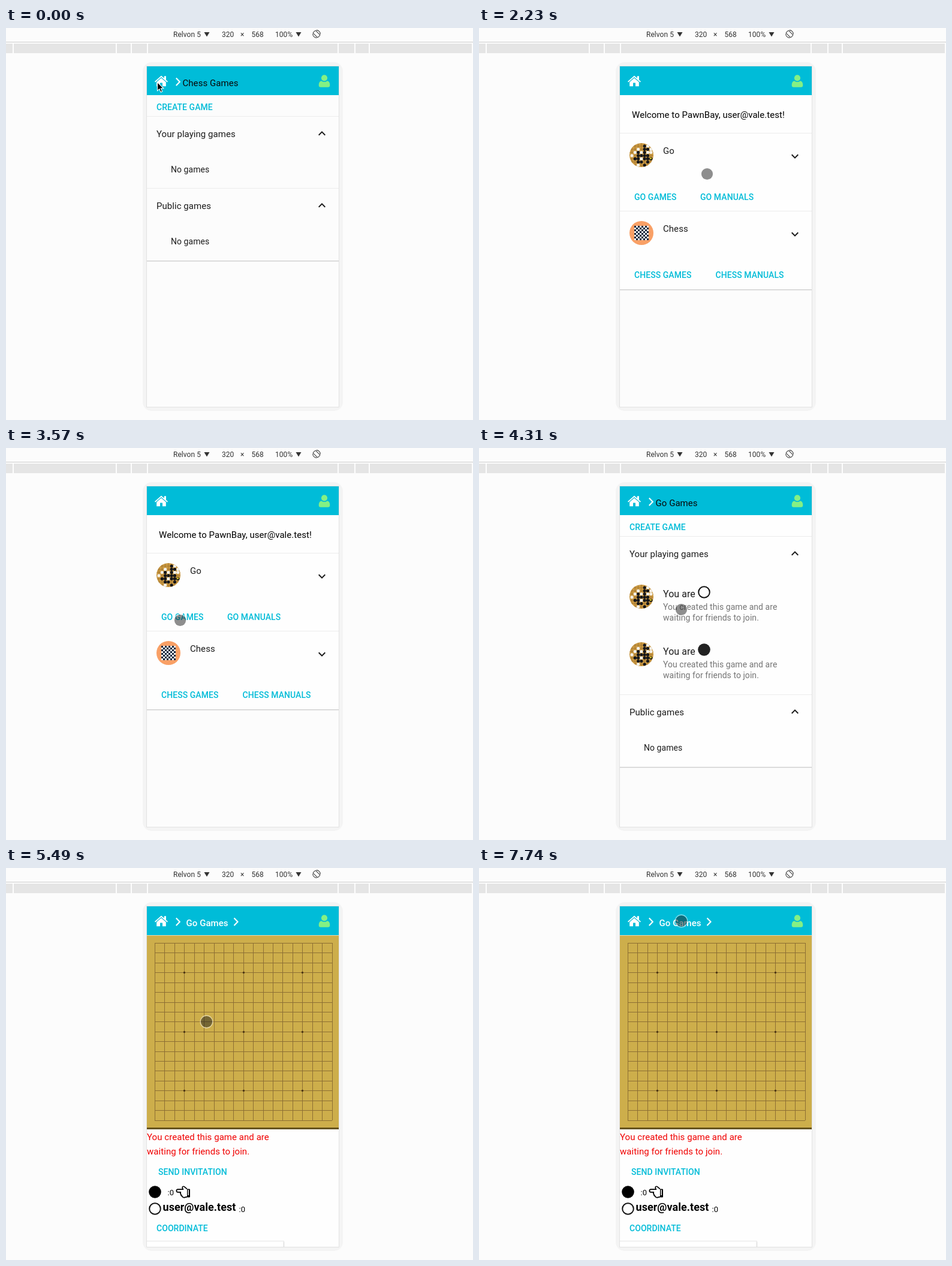
These frames come from a looping animation (779x654 px, 8000 ms). An HTML page:

```html
<!DOCTYPE html>
<html lang="en">
<head>
<meta charset="utf-8">
<title>Board game app</title>
<style>
html, body { margin: 0; width: 100%; height: 100%; overflow: hidden; background: #fcfcfc; }
svg { display: block; width: 100vw; height: 100vh; }
text { font-family: Roboto, Arial, sans-serif; font-size: 15px; letter-spacing: .05px; white-space: pre; }
</style>
</head>
<body>
<svg id="stage" viewBox="0 0 779 654"></svg>
<script>
const LOOP = 8000;
const CYAN = '#00bcd8', INK = '#1c1c1c';
const MAIL = 'user@vale.test';

const rect = (x, y, w, h, fill, more = '') =>
  `<rect x="${x}" y="${y}" width="${w}" height="${h}" fill="${fill}" ${more}/>`;
const disc = (x, y, r, fill, more = '') =>
  `<circle cx="${x}" cy="${y}" r="${r}" fill="${fill}" ${more}/>`;
const path = (d, fill, more = '') => `<path d="${d}" fill="${fill}" ${more}/>`;
const text = (x, y, s, fill = INK, size = 15, weight = 400) =>
  `<text x="${x}" y="${y}" fill="${fill}" style="font-size:${size}px;font-weight:${weight}">${s}</text>`;
const button = (x, y, s) => text(x, y, s, CYAN, 14, 500);
const divider = y => rect(235, y, 320, 1, '#ececec');
const ring = (x, y) => disc(x, y, 9.3, 'none', 'stroke="#111" stroke-width="2"');
const move = (x, y, body) => `<g transform="translate(${x} ${y})">${body}</g>`;
const times = (n, f) => Array.from({ length: n }, (_, i) => f(i)).join('');

const paper = (bottom, fill = '#fefefe') =>
  rect(235, 112, 320, bottom - 112, fill) +
  rect(235, bottom, 320, 1, '#cfcfcf') + rect(235, bottom + 1, 320, 1, '#e9e9e9');

const arrowUp = y => move(515, y - 12, path('M12 8l-6 6 1.41 1.41L12 10.83l4.59 4.58L18 14z', INK));
const arrowDown = y => move(515, y - 12, path('M16.59 8.59L12 13.17 7.41 8.59 6 10l6 6 6-6z', INK));
const crumb = x => path(`M${x} 83.5l6 6.2-6 6.2`, 'none', 'stroke="#fff" stroke-width="2.1"');

function goAvatar(x, y) {
  const rows = ['....bw.', '..w.bbw', '.wbwbww', 'w.bbbb.', '.bbwbbb', '..bb.b.', '..w.b..'];
  const lines = times(7, i => path(`M${-16 + i * 5.3} -20v40M-20 ${-15 + i * 5.3}h40`, 'none',
    'stroke="#93682a" stroke-width=".6"'));
  const stones = rows.map((row, j) => [...row].map((c, i) => c === '.' ? '' :
    disc(-16 + i * 5.3, -15 + j * 5.3, 2.6, c === 'b' ? '#17171a' : '#f5f1e8')).join('')).join('');
  return move(x, y, disc(0, 0, 20, '#cc9a42') +
    `<g clip-path="url(#round)">${lines}${stones}${disc(15.5, 5.5, 1.6, '#d9c622')}</g>`);
}

function chessAvatar(x, y) {
  const dark = times(32, k => {
    const j = k >> 2, i = (k & 3) * 2 + (j & 1);
    return rect(-12 + i * 3, -12 + j * 3, 3, 3, '#18273d');
  });
  return move(x, y, disc(0, 0, 20, '#f9a066') + rect(-12, -12, 24, 24, '#eef0f0') + dark);
}

function toolbar() {
  const drop = x => path(`M${x} 7h9l-4.5 7.5z`, '#333');
  const label = (x, s) => text(x, 15, s, '#333', 12);
  const turn = move(518, 10,
    '<g fill="none" stroke="#444" stroke-width="1.1">' +
    '<rect x="-3" y="-5.6" width="6" height="11.2" rx="1" transform="rotate(-45)"/>' +
    '<path d="M-.5 -6.3A6.3 6.3 0 0 1 6.3 .5M.5 6.3A6.3 6.3 0 0 1 -6.3 -.5"/></g>');
  const gaps = [11, 183, 208, 235, 553, 581, 605, 777].map(x => rect(x, 26, 2, 16, '#fdfdfd')).join('');
  return label(279, 'Relvon 5') + drop(330.5) + label(360, '320') + label(391, '×') +
    label(409.5, '568') + label(449, '100%') + drop(483.5) + turn +
    rect(0, 23, 779, 1, '#cccccc') + rect(0, 26, 779, 16, '#e5e5e5') + gaps;
}

function phone() {
  return rect(228, 57, 334, 582, '#f4f4f4', 'rx="15"') +
    rect(234, 63, 322, 570, '#e2e2e2') + rect(235, 64, 320, 568, '#fcfcfc');
}

function header() {
  const home = path('M248 89.2L259 79.6L263.8 83.8V80.3H267V86.6L270 89.2L268.8 90.5L259 82L249.2 90.5Z', '#fff') +
    path('M259 83.4L266.8 90.2V97.3H261V91.5H257V97.3H251.2V90.2Z', '#fff');
  const user = disc(531, 83.4, 5.1, '#84f084') +
    path('M526 88.2Q531 92 536 88.2Q540.3 89 540.3 95.5Q540.3 98.8 537 98.8H525Q521.7 98.8 521.7 95.5Q521.7 89 526 88.2Z', '#84f084');
  return rect(235, 64, 320, 48, CYAN) + home + user;
}

function listHead(title) {
  return crumb(283.8) + text(294.5, 97, title, '#080808') + button(251, 137, 'CREATE GAME') +
    divider(147) + text(251, 182, 'Your playing games') + arrowUp(176);
}

const publicGames = y => divider(y) + text(251, y + 35, 'Public games') + arrowUp(y + 29) +
  text(275, y + 94, 'No games', INK, 14);

const chessList = () => paper(388, '#fcfcfc') + listHead('Chess Games') +
  text(275, 241, 'No games', INK, 14) + publicGames(267);

const homePage = () => paper(436) + text(255, 150, `Welcome to PawnBay, ${MAIL}!`, '#000') +
  divider(175) + goAvatar(271, 212) + text(307, 210, 'Go') + arrowDown(214) +
  button(259, 287, 'GO GAMES') + button(369, 287, 'GO MANUALS') +
  divider(305) + chessAvatar(271, 342) + text(307, 340, 'Chess') + arrowDown(344) +
  button(259, 417, 'CHESS GAMES') + button(394.5, 417, 'CHESS MANUALS');

function goList() {
  const item = (y, mark) => goAvatar(271, y) + text(307, y + 1, 'You are', INK, 16) + mark +
    text(307, y + 22, 'You created this game and are', '#757575', 14) +
    text(307, y + 40, 'waiting for friends to join.', '#757575', 14);
  return paper(532) + listHead('Go Games') + item(248, ring(375.5, 240.5)) +
    item(344, disc(375.5, 336.5, 10.3, '#222')) + publicGames(411);
}

const gameHead = () => crumb(283.8) + text(300.5, 97, 'Go Games', '#fff', 15, 500) + crumb(380.5);

const loading = () => rect(235, 112, 320, 422, '#fefefe') + gameHead() +
  text(235, 145, 'Loading...', '#000');

function board() {
  const at = (base, i) => Math.round(base + i * 16.42);
  const lines = times(19, i => rect(at(248, i), 125, 1, 296, '#8d6f33') + rect(248, at(125, i), 296, 1, '#8d6f33'));
  const stars = times(9, k => disc(at(248, 3 + k % 3 * 6) + .5, at(125, 3 + (k / 3 | 0) * 6) + .5, 1.7, '#4b3512'));
  return rect(235, 112, 320, 1, '#e9dcae') + rect(235, 113, 320, 320, '#cdae4b') +
    rect(235, 433, 320, 3, '#65531f') + lines + stars;
}

function game() {
  const hand = path('M302 535.6L298 532.2Q295.4 530.2 294.2 532.4Q293.8 533.6 295.4 536.2H286.6Q284.4 536.4 284.4 538.5' +
    'Q284.4 540.7 286.6 540.9H291.4Q290 543 292 544.6Q291.6 546.8 293.8 547.4Q294.4 549.8 297 549.8L302 548.6',
    'none', 'stroke="#000" stroke-width="1.7" stroke-linejoin="round"') +
    rect(302, 535.5, 5, 14, '#000', 'rx="1"') + rect(303.4, 537, 1.5, 9, '#fff');
  return rect(235, 112, 320, 520, '#fefefe') + gameHead() + board() +
    text(235, 454, 'You created this game and are', '#f00000') +
    text(235, 478, 'waiting for friends to join.', '#f00000') +
    button(254, 512, 'SEND INVITATION') +
    disc(248.5, 540.5, 10.3, '#000') + text(269.5, 546, ':0', '#000', 13) + hand +
    ring(248.5, 568.5) + text(261.5, 572, MAIL, '#000', 18, 700) + text(388.5, 574, ':0', '#000', 13) +
    button(251, 606, 'COORDINATE') +
    rect(235, 622, 229, 10, '#e6e6e6') + rect(235, 623, 228, 9, '#ffffff') + rect(463, 624, 1, 8, '#cfcfcf');
}

// Each page stays until the next one starts.
const pages = [[0, chessList], [1050, homePage], [4020, goList], [5340, loading], [5490, game]];

// Pointer moves: start, end, one position per step.
const moves = [
  [1050, 2080, [[256, 87], [258, 93], [270, 109], [292, 135], [320, 168], [346, 196], [364, 214], [371, 222]]],
  [2230, 3270, [[380.5, 243.5], [371, 252], [350, 264], [325, 275], [300, 284], [284, 290], [281, 291], [292, 292]]],
  [3420, 3570, [[291.5, 286], [290.5, 287.5]]],
  [4020, 5050, [[290.5, 287.5], [318, 277], [337.5, 269.5], [342, 265], [341, 262], [338, 259], [336, 257.5], [334.5, 256.5]]],
  [7140, 7740, [[338, 240], [347, 200], [348.5, 150], [343, 108], [337.5, 88.5]]]
];

function pointer(t) {
  const past = moves.filter(m => t >= m[0]);
  if (!past.length) return null;
  const [from, to, spots] = past[past.length - 1];
  const last = spots.length - 1;
  return spots[Math.min(last, Math.floor((t - from) / (to - from) * last + .05))];
}

const stage = document.getElementById('stage');
stage.innerHTML = '<clipPath id="round"><circle r="20"/></clipPath>' +
  rect(0, 0, 779, 654, '#fcfcfc') + toolbar() + phone() + header() +
  pages.map(p => `<g class="page">${p[1]()}</g>`).join('') +
  '<g id="arrow">' + path('M252.5 90.5V104.8L255.8 101.7L258.1 107L260.7 105.9L258.4 100.8H262.8Z', '#000',
    'stroke="#fff" stroke-width="1.1"') + '</g>' +
  '<g id="touch">' + disc(0, 0, 10.2, 'none', 'stroke="#fff" stroke-opacity=".5" stroke-width="1.4"') +
  disc(0, 0, 9.6, '#1e1e1e', 'fill-opacity=".5"') + '</g>';

const groups = [...stage.querySelectorAll('.page')];
const arrow = document.getElementById('arrow');
const touch = document.getElementById('touch');
const show = (el, on) => el.setAttribute('display', on ? 'inline' : 'none');

function draw(t) {
  const current = pages.filter(p => t >= p[0]).length - 1;
  groups.forEach((g, i) => show(g, i === current));
  const spot = pointer(t);
  show(arrow, !spot);
  show(touch, spot);
  if (spot) touch.setAttribute('transform', `translate(${spot})`);
}

const start = performance.now();
function tick() {
  draw((performance.now() - start) % LOOP);
  requestAnimationFrame(tick);
}
draw(0);
requestAnimationFrame(tick);
</script>
</body>
</html>
```
